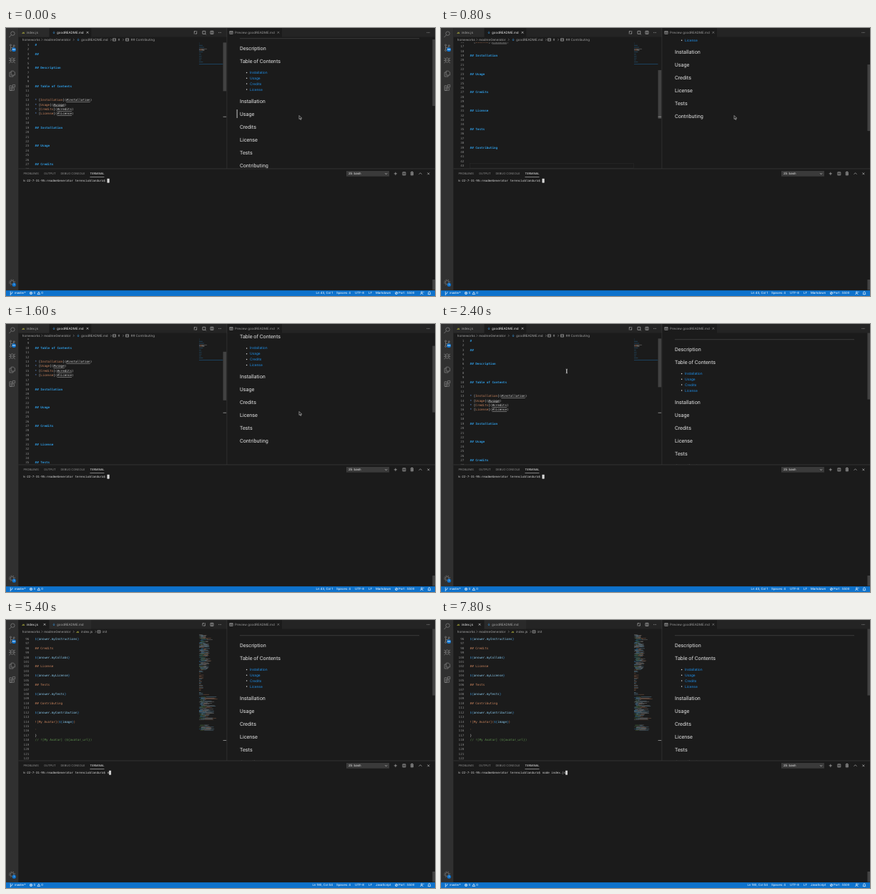
Write an HTML page that moves like this. It is 600 px wide and 375 px high and loops after 8 s.

```html
<!DOCTYPE html>
<html lang="en">
<head>
<meta charset="utf-8">
<title>Readme generator</title>
<style>
  html, body { margin: 0; width: 100%; height: 100%; overflow: hidden; background: #1b1b1b; }
  svg { display: block; width: 100%; height: 100%; }
  text { white-space: pre; text-rendering: geometricPrecision; font-family: Inter, sans-serif; }
  .code text { font: 4.286px "DejaVu Sans Mono", monospace; }
  .head { font-family: Roboto, sans-serif; }
  .term { font-family: "DejaVu Sans Mono", monospace; }
  .icon { fill: none; stroke-width: .65; }
</style>
</head>
<body>
<svg id="stage" viewBox="0 0 600 375"></svg>
<script>
const LOOP = 8000, TICK = 200, ROW = 45 / 7, TOP = 20.36, MINI = 2 / 2.8;
const SWITCH = 3600, FOCUS = 4800, TYPING = 5400;
const GREY = '#a6a6a6', WHITE = '#ececec', BLUE = '#2f9be2', ORANGE = '#d08860', PALE = '#8ccdf2', GREEN = '#5f9350';
const PROMPT = 'k-22-7-31-95:readmeGenerator terencioblandura$ ';
const COMMAND = 'node index.js';

const rect = (x, y, w, h, fill, extra = '') =>
  `<rect x="${x}" y="${y}" width="${w}" height="${h}" fill="${fill}" ${extra}/>`;
const icon = (d, color = '#bdbdbd', extra = '') => `<path class="icon" d="${d}" stroke="${color}" ${extra}/>`;
const circle = (x, y, r, fill) => `<circle cx="${x}" cy="${y}" r="${r}" fill="${fill}"/>`;
// y is the vertical middle of the text
const label = (x, y, str, size = 4.5, fill = GREY, extra = '') =>
  `<text x="${x}" y="${y + size * .35}" font-size="${size}" fill="${fill}" ${extra}>${str}</text>`;
const group = (id, body, extra = '') => `<g id="${id}" ${extra}>${body}</g>`;
const span = (str, fill, extra = '') => `<tspan fill="${fill}" ${extra}>${str}</tspan>`;

const cross = (x, y, c) => icon(`M${x - 1.4} ${y - 1.4}l2.8 2.8m0-2.8l-2.8 2.8`, c);
const dots = (x, y) => [-1.6, 0, 1.6].map(d => circle(x + d, y, .45, '#c5c5c5')).join('');
const splitIcon = (x, y) => icon(`M${x - 2} ${y - 2}h4v4h-4zM${x} ${y - 2}v4`);
const chevron = (x, y) => icon(`M${x - .7} ${y - 1.4}l1.4 1.4l-1.4 1.4`, '#888', 'stroke-width=".45"');
const compare = (x, y) => icon(`M${x - 1.7} ${y + .8}v-2.6h2.2M${x + 1.7} ${y - .8}v2.6h-2.2` +
  `M${x - 2.3} ${y + 1.6}h1.2M${x + 1.1} ${y - 1.6}h1.2`);
const symbol = (x, y) => icon(`M${x - 2} ${y - 1.7}h4v3.4h-4zM${x - .8} ${y - .7}v1.4M${x + .8} ${y - .7}v1.4`, '#b0b0b0', 'stroke-width=".5"');
const arrowDown = (x, y) => icon(`M${x} ${y - 1.7}v3m-1.2-1.2l1.2 1.3l1.2-1.3`, '#3794d8', 'stroke-width=".9"');
const jsMark = (x, y) => label(x, y, 'JS', 3.1, '#cbcb41', 'font-weight="700"');

const sections = ['Installation', 'Usage', 'Credits', 'License', 'Tests', 'Contributing'];
const links = sections.slice(0, 4);

// Document lines: number -> list of [text, color, attributes]
const bold = 'font-weight="700"';
const heading = str => [[str, BLUE, bold]];
const markdown = { 1: heading('#'), 3: heading('##'), 6: heading('## Description'), 10: heading('## Table of Contents') };
links.forEach((name, i) => markdown[13 + i] = [
  ['* ', '#6796e6'], ['[', '#d0d0d0'], [name, ORANGE], ['](', '#d0d0d0'],
  ['#' + name.toLowerCase(), '#d8d8d8', 'text-decoration="underline"'], [')', '#d0d0d0']]);
sections.forEach((name, i) => markdown[19 + 4 * i] = heading('## ' + name));

const answer = key => [['${', '#3f93d0'], ['answer.' + key, PALE], ['}', '#3f93d0']];
const script = {
  96: answer('myInstructions'),
  114: [['![My Avatar](', ORANGE], ['${', '#3f93d0'], ['image', PALE], ['}', '#3f93d0'], [')', ORANGE]],
  116: [['`', ORANGE]], 117: [['}', '#d4d4d4']], 118: [['// ![My Avatar] (${avatar_url})', GREEN]]
};
['Collabs', 'License', 'Tests', 'Contribution'].forEach((key, i) => {
  script[98 + 4 * i] = [['## ' + sections[2 + i], ORANGE]];
  script[100 + 4 * i] = answer('my' + key);
});

function codeLines(doc, from, to) {
  let out = '';
  for (let n = from; n <= to; n++) {
    const y = TOP + (n - 1) * ROW + 4.7;
    out += `<text x="32.3" y="${y}" fill="#858585" text-anchor="end">${n}</text>`;
    if (doc[n]) out += `<text x="40.6" y="${y}">${doc[n].map(p => span(...p)).join('')}</text>`;
  }
  return out;
}

const miniBar = (row, x, w, fill) => rect(270 + x, TOP + row * MINI, w, .5, fill, 'opacity=".55"');

function markdownMap() {
  let out = rect(270, 50.2, 33.5, .7, '#1c527c');
  for (const n in markdown) {
    let x = 0;
    for (const [str, fill] of markdown[n]) {
      out += miniBar(n - 1, x, str.length / 2.8, fill);
      x += str.length / 2.8;
    }
  }
  return out;
}

function scriptMap() {
  let seed = 11, out = '';
  const random = () => (seed = seed * 16807 % 2147483647) / 2147483647;
  const pick = list => list[Math.floor(random() * list.length)];
  for (let row = 0; row < 188; row++) {
    const template = row > 68 && row < 117;
    const blank = row > 117 && row < 122 || row > 166 && row < 177 || row % 17 === 9;
    if (blank || template && row % 2 === 0) continue;
    const indent = template ? 0 : Math.floor(random() * 3) * 1.4;
    const first = 2 + random() * (template ? 5 : 6);
    out += miniBar(row, indent, first, pick(template ? [ORANGE, PALE] : [PALE, '#bbb', BLUE, GREEN]));
    if (!template) out += miniBar(row, indent + first + .4, random() * (row > 120 ? 18 : 8), pick([ORANGE, PALE, '#bbb']));
  }
  return out;
}

function previewPage() {
  const title = (y, str) => label(327, y, str, 7.25, '#e2e2e2', 'class="head"');
  return rect(327, 21.6, 251, .5, '#5a5a5a') + title(35.2, 'Description') + title(53, 'Table of Contents') +
    links.map((s, i) => circle(336.6, 69.4 + 7.85 * i, .75, '#ddd') + label(341, 69.3 + 7.85 * i, s, 4.85, '#1f8fe8')).join('') +
    sections.map((s, i) => title(109 + 18 * i, s)).join('') +
    rect(322.6, 121, 1.1, 12, '#b5b5b5', 'id="activeBlock"');
}

const activityBar = rect(0, 0, 17.3, 367.2, '#303030') +
  icon('M9.2 7.7m-2.5 0a2.7 2.7 0 1 0 5.4 0a2.7 2.7 0 1 0-5.4 0M7.4 9.8l-3 3.2', '#8c8c8c', 'stroke-width=".8"') +
  icon('M6.5 25.2v5M6.5 27.8q4 0 4.6-2M5.5 24a1 1 0 1 0 2 0a1 1 0 1 0-2 0M5.5 31.4a1 1 0 1 0 2 0a1 1 0 1 0-2 0M10.2 24.8a1 1 0 1 0 2 0a1 1 0 1 0-2 0', '#8c8c8c') +
  circle(11, 30.2, 2.9, '#0e72cc') + label(11, 30.2, '84', 3, '#fff', 'text-anchor="middle" font-weight="600"') +
  icon('M6 45a2.6 3.2 0 1 0 5.2 0a2.6 3.2 0 1 0-5.2 0M6 45h5.2M4.3 42l2 1.2M12.9 42l-2 1.2M4 45.4h2M11.2 45.4h2M4.4 49l1.9-1.4M12.8 49l-1.9-1.4', '#8c8c8c', 'stroke-width=".8"') +
  icon('M7.2 60.2h3.4l1.8 1.8v4h-5.2zM7.2 62h-2.2v6h5v-2', '#8c8c8c', 'stroke-width=".8"') +
  icon('M5 80.8h3.2v6.4h-3.2zM5 84h6.4v3.2h-6.4M9.4 79.4h3.2v3.2h-3.2z', '#8c8c8c', 'stroke-width=".8"') +
  icon('M6 356a2.5 2.5 0 1 0 5 0a2.5 2.5 0 1 0-5 0', '#8c8c8c') +
  icon('M4.6 356a3.9 3.9 0 1 0 7.8 0a3.9 3.9 0 1 0-7.8 0', '#8c8c8c', 'stroke-dasharray="1.6 1.45" stroke-width="1.2"') +
  circle(11.3, 359.2, 2.6, '#0e72cc') + label(11.3, 359.2, '1', 3.2, '#fff', 'text-anchor="middle"');

const statusBar = rect(0, 367.15, 600, 7.85, '#0e72cc') +
  icon('M6.3 369.6v3.4M6.3 372q2.6 0 2.6-1.7M5.7 369.2h1.2M5.7 373.4h1.2M8.3 369.7h1.2', '#fff') +
  label(12, 371, 'master*', 4.2, '#fff') +
  icon('M33.3 371a1.7 1.7 0 1 0 3.4 0a1.7 1.7 0 1 0-3.4 0M34.3 370.3l1.4 1.4m0-1.4l-1.4 1.4', '#fff', 'stroke-width=".45"') + label(38.5, 371, '0', 4.2, '#fff') +
  icon('M45.8 369.2l1.8 3.4h-3.6z', '#fff', 'stroke-width=".5"') + label(49.3, 371, '0', 4.2, '#fff') +
  [[462, 'Spaces: 4'], [488, 'UTF-8'], [507, 'LF'], [549, 'Port : 5500']].map(([x, s]) => label(x, 371, s, 4.25, '#fff')).join('') +
  icon('M544.4 371a1.6 1.6 0 1 0 3.2 0a1.6 1.6 0 1 0-3.2 0M545 372.1l2.3-2.3', '#fff', 'stroke-width=".45"') +
  icon('M579.6 373q0-1.6 1.8-1.6t1.8 1.6M580.4 369.8a1 1 0 1 0 2 0a1 1 0 1 0-2 0M583.4 369.4h1.2', '#fff', 'stroke-width=".5"') +
  icon('M590 372.4h4l-.6-1v-1.2q-.2-1.4-1.4-1.4t-1.4 1.4v1.2zM591.6 373.2h.8', '#fff', 'stroke-width=".5"');

const panel = rect(17.3, 196.7, 583, .5, '#454545') +
  [[24.4, 'PROBLEMS'], [53, 'OUTPUT'], [76.5, 'DEBUG CONSOLE']].map(([x, s]) => label(x, 204, s, 3.95, '#8f8f8f')).join('') +
  label(117.6, 204, 'TERMINAL', 3.95, WHITE) + rect(117.4, 208, 20, .5, '#ddd') +
  rect(476, 200, 60, 7.6, '#3a3a3a') + label(479, 203.9, '25: bash', 4.3, '#eee') +
  icon('M530.2 203.2l1.4 1.4l1.4-1.4', '#ddd') +
  icon('M542.7 203.8h4.2M544.8 201.7v4.2') + splitIcon(556.8, 203.8) +
  icon('M565.8 202h4M567 202v-.8h1.6v.8M566.3 202.3v3.6h3v-3.6M567.3 203v2.2M568.4 203v2.2') +
  icon('M577.5 204.7l2-2l2 2') + cross(590.8, 203.8, '#c5c5c5') +
  label(24.3, 213.5, PROMPT, 4.15, '#d8d8d8', 'class="term"') +
  `<text id="typed" class="term" x="141.8" y="214.95" font-size="4.15" fill="#d8d8d8"></text>` +
  rect(141.8, 211, 2.5, 5.3, '#d8d8d8', 'id="caret" stroke="#d8d8d8" stroke-width=".5"') +
  rect(596.4, 352, 3.6, 14.5, '#434343');

const path = label(22.8, 16.4, 'homeworks') + chevron(50.3, 16.4) + label(53, 16.4, 'readmeGenerator') + chevron(94.6, 16.4);

const markdownView =
  rect(17.3, 0, 43, 12.5, '#2a2a2a') + jsMark(22.2, 6.5) + label(28.6, 6.4, 'index.js') +
  rect(60.7, 0, 58.5, 12.5, '#1b1b1b') + arrowDown(67, 6.3) + label(71, 6.4, 'goodREADME.md', 4.5, WHITE) + cross(114, 6.3, '#ddd') +
  compare(265, 6.3) + icon('M275 4.3h3.8v4h-3.8zM278.6 8.2l1.2 1.2') +
  path + arrowDown(101, 16.3) + label(105, 16.4, 'goodREADME.md') + chevron(147, 16.4) + symbol(151.5, 16.4) +
  label(156.5, 16.4, '#') + chevron(164, 16.4) + symbol(169.5, 16.4) + label(174.6, 16.4, '## Contributing') +
  group('doc', rect(40.6, TOP + 42 * ROW, 229, ROW, 'none', 'stroke="#292929" stroke-width=".6"') + codeLines(markdown, 1, 47), 'class="code"')
    .replace(/^/, '<g clip-path="url(#editorClip)">') + '</g>' +
  markdownMap() + rect(303.6, TOP, 4.6, 68, '#424242', 'id="thumb"') + rect(303.6, 123.8, 4.6, .8, '#a0a0a0') +
  label(457, 371, 'Ln 43, Col 1', 4.25, '#fff', 'text-anchor="end"') + label(517, 371, 'Markdown', 4.25, '#fff');

const scriptView =
  rect(17.3, 0, 43, 12.5, '#1b1b1b') + jsMark(22.2, 6.5) + label(28.6, 6.4, 'index.js', 4.5, WHITE) + cross(54, 6.3, '#ddd') +
  rect(60.7, 0, 58.5, 12.5, '#2a2a2a') + arrowDown(67, 6.3) + label(71, 6.4, 'goodREADME.md') + compare(276.7, 6.3) +
  path + jsMark(98.3, 16.5) + label(105, 16.4, 'index.js') + chevron(125.3, 16.4) + symbol(130, 16.4) + label(134.8, 16.4, 'init') +
  `<g clip-path="url(#editorClip)"><g class="code" transform="translate(0 ${-94.56 * ROW})">${codeLines(script, 96, 122)}</g></g>` +
  scriptMap() + rect(303.6, 98.5, 4.6, 23.5, '#424242', 'id="scriptThumb"') + rect(303.6, 168, 4.6, .8, '#a0a0a0') +
  label(457, 371, 'Ln 180, Col 54', 4.25, '#fff', 'text-anchor="end"') + label(517, 371, 'JavaScript', 4.25, '#fff');

const pointers =
  group('arrow', '<path d="M0 0v5l1.2-1l.8 1.9l.9-.4l-.8-1.8h1.6z" fill="#111" stroke="#eee" stroke-width=".5"/>') +
  group('beam', icon('M-1.1-2.9q1.1 0 1.1.8v4.2q0 .8-1.1.8M1.1-2.9q-1.1 0-1.1.8v4.2q0 .8 1.1.8', '#eee')) +
  group('hand', '<path d="M-.6-2.4h1v2.1l2 .5v1.7l-.7 1.6h-2.6l-1.6-2.2l.6-.6l1.3.8z" fill="#fff" stroke="#222" stroke-width=".4"/>');

const $ = id => document.getElementById(id);
$('stage').innerHTML =
  `<defs><clipPath id="editorClip">${rect(17.3, TOP, 291, 176.3, '#000')}</clipPath>
   <clipPath id="previewClip">${rect(309, 12.5, 291, 184, '#000')}</clipPath></defs>` +
  rect(0, 0, 600, 375, '#1b1b1b') + rect(17.3, 0, 583, 12.5, '#242424') + activityBar + statusBar +
  group('markdownView', markdownView) + group('scriptView', scriptView) +
  splitIcon(288, 6.3) + dots(299, 6.3) +
  rect(309, 0, 77, 12.5, '#1b1b1b') + icon('M312.8 4.5h4.4v3.8h-4.4zM312.8 5.8h4.4M315 5.8v2.5', '#aaa') +
  label(320, 6.4, 'Preview goodREADME.md', 4.5, '#9c9c9c') + cross(380.8, 6.3, '#8a8a8a') + dots(590.5, 6.3) +
  `<g clip-path="url(#previewClip)">${group('preview', previewPage())}</g>` +
  rect(596.4, 12.5, 3.6, 93, '#424242', 'id="previewThumb"') +
  rect(308.7, 0, .5, 196.7, '#424242') + panel + pointers;

// Piecewise linear value through [time, value] keys
function through(t, keys) {
  const i = keys.findIndex(k => k[0] > t);
  if (i < 0) return keys[keys.length - 1][1];
  if (i === 0) return keys[0][1];
  const [[t0, a], [t1, b]] = [keys[i - 1], keys[i]];
  return a + (b - a) * (t - t0) / (t1 - t0);
}

const docScroll = [[0, 0], [200, 5], [400, 13], [600, 15], [1200, 17], [1400, 13], [1800, 2], [2000, 0]];
const previewScroll = [[0, 7], [200, 29], [400, 64], [600, 73], [1200, 81], [1400, 62], [1800, 9], [2000, 0]];
const pointerX = [[2200, 410], [2400, 175.8], [2600, 160], [3400, 50], [3600, 46], [3800, 46], [4600, 120]];
const pointerY = [[2200, 122.5], [2400, 66], [2600, 60], [3400, 12], [3600, 10.5], [3800, 11], [4600, 209]];
const typedCount = [[5200, 0], [6200, 5], [6400, 7], [6600, 9], [7000, 9], [7800, 13]];

const show = (id, on) => $(id).setAttribute('visibility', on ? 'visible' : 'hidden');
const move = (id, x, y) => $(id).setAttribute('transform', `translate(${x} ${y})`);

function render(t) {
  const lines = through(t, docScroll), offset = through(t, previewScroll);
  move('doc', 0, -lines * ROW);
  move('thumb', 0, lines * ROW * .383);
  move('preview', 0, -offset);
  move('previewThumb', 0, offset * .51);
  show('activeBlock', t < 800);
  show('markdownView', t < SWITCH);
  show('scriptView', t >= SWITCH);
  show('scriptThumb', t >= SWITCH && t < 4400);

  const count = Math.round(through(t, typedCount));
  $('typed').textContent = COMMAND.slice(0, count);
  move('caret', count * 2.5, 0);
  $('caret').setAttribute('fill-opacity', t >= SWITCH && t < FOCUS ? 0 : 1);

  const x = through(t, pointerX), y = through(t, pointerY);
  const shape = t >= TYPING ? '' : t < 2400 ? 'arrow' : y < 20 ? 'hand' : 'beam';
  for (const id of ['arrow', 'beam', 'hand']) {
    move(id, x, y);
    show(id, id === shape);
  }
}

const start = performance.now();
function tick() {
  const t = (performance.now() - start) % LOOP;
  render(Math.floor(t / TICK) * TICK);
  requestAnimationFrame(tick);
}
tick();
</script>
</body>
</html>
```
